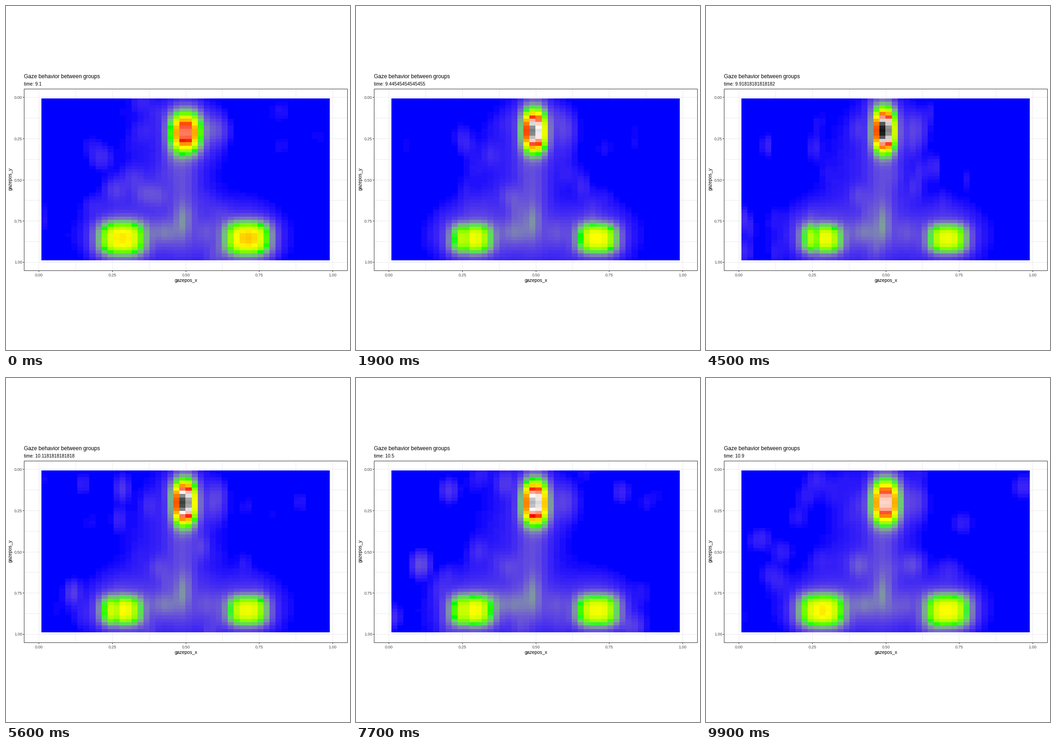
Animation of 748x748 px, one loop 10 s. Source, as a matplotlib script:

```python
import numpy as np
import matplotlib.pyplot as plt
from matplotlib.animation import FuncAnimation

SIZE, FRAMES, STEP = 748, 100, 11
X0, XS, Y0, YS = 71.45, 639.1, 197.45, 359.1  # data to pixels
GX, GY = np.meshgrid(np.arange(1, 49) / 49, np.arange(1, 49) / 49)

plt.rcParams["font.family"] = "Liberation Sans"


# colour scale, blended in Lab
M = np.array([[.4124564, .3575761, .1804375],
              [.2126729, .7151522, .0721750],
              [.0193339, .1191920, .9503041]])
WHITE = M.sum(axis=1)


def to_lab(rgb):
    rgb = np.asarray(rgb, float)
    lin = np.where(rgb > .04045, ((rgb + .055) / 1.055) ** 2.4, rgb / 12.92)
    t = lin @ M.T / WHITE
    x, y, z = np.where(t > .008856, np.cbrt(t), 7.787 * t + 16 / 116).T
    return np.stack([116 * y - 16, 500 * (x - y), 200 * (y - z)], axis=1)


def to_rgb(lab):
    l, a, b = lab.T
    y = (l + 16) / 116
    f = np.stack([y + a / 500, y, y - b / 200], axis=1)
    t = np.where(f > .206893, f ** 3, (f - 16 / 116) / 7.787)
    lin = np.clip((t * WHITE) @ np.linalg.inv(M).T, 0, 1)
    return np.where(lin > .0031308, 1.055 * lin ** (1 / 2.4) - .055, 12.92 * lin)


STOPS = to_lab([(0, 0, 1), (0, 1, 0), (1, 1, 0), (1, 0, 0), (1, 1, 1), (0, 0, 0)])
ramp = np.linspace(0, 1, 1001)
LUT = to_rgb(np.stack([np.interp(ramp, np.linspace(0, 1, 6), c) for c in STOPS.T], axis=1))


# gaze density
def blob(x, y, a, wx, wy, p=2):
    return a * np.exp(-np.abs((GX - x) / wx) ** p - np.abs((GY - y) / wy) ** p)


HANDS = .283, .711

BASE = (blob(.48, .84, .024, .26, .16)       # band between the hands
        + blob(.45, .5, .012, .15, .42)      # haze
        + blob(.49, .55, .028, .045, .3)     # trunk
        + blob(.49, .75, .055, .022, .1)
        + blob(.43, .82, .05, .045, .065)
        + blob(.57, .82, .02, .03, .07)
        + blob(.41, .6, .022, .03, .065)
        + blob(.5, .21, .02, .075, .2)       # halos
        + blob(.6, .2, .028, .035, .1)
        + sum(blob(x, .84, .03, .09, .16) for x in HANDS))


def sway(k, *values):
    """Value at step k, between four key poses."""
    return np.interp(k, (0, 19, 45, 99), values)


def focus(k):
    return sway(k, 0, .6, 1, .1)


def peaks(k):
    head = blob(sway(k, .5, .496, .496, .5), sway(k, .216, .207, .203, .203),
                sway(k, .65, .87, .97, .75), sway(k, .047, .036, .033, .041),
                sway(k, .112, .117, .122, .12), 2.5)
    size = sway(k, 1, .88, .85, .98)
    left = blob(HANDS[0], .858, sway(k, .38, .34, .34, .37), .074 * size, .096 * size, 3)
    right = blob(HANDS[1], .858, sway(k, .41, .36, .34, .36), .072 * size, .096 * size, 3)
    notch = 1 - .35 * focus(k) * np.exp(-((GX - .265) / .012) ** 2)
    return head + left * notch + right


def speckle(k):
    """Stray glances, narrower while the gaze is focused."""
    rng = np.random.default_rng(k + 3)
    wx = .036 - .016 * focus(k)
    return sum(blob(rng.normal(.42, .26), rng.random(), abs(rng.normal(0, .011)), wx, .066)
               for _ in range(42))


SPECKLE = [speckle(k) for k in range(0, FRAMES, STEP)]


def heat(k):
    i, part = divmod(k, STEP)
    j = min(i + 1, len(SPECKLE) - 1)
    stray = SPECKLE[i] + (SPECKLE[j] - SPECKLE[i]) * part / STEP
    v = np.clip(BASE + peaks(k) + stray - .003, 0, 1)
    return LUT[np.round(v * 1000).astype(int)]


# plot
fig = plt.figure(figsize=(SIZE / 100, SIZE / 100), dpi=100, facecolor="white")
ax = fig.add_axes([0, 0, 1, 1])
ax.axis("off")


def mid(v):
    return np.floor(v) + .5


def line(x1, y1, x2, y2, color, z):
    ax.plot([x1, x2], [y1, y2], color=color, lw=.72, zorder=z, solid_capstyle="butt")


def text(x, y, s, px, color="black", va="baseline", **kw):
    return ax.text(x, y, s, fontsize=px * .72, color=color, va=va, **kw)


LEFT, RIGHT, TOP, BOTTOM = 39.5, 742.5, 179.5, 574.5
LIGHT, DARK, GREY = "#ebebeb", "#333333", "#4d4d4d"

for i in range(9):
    t = i / 8
    x, y = mid(X0 + t * XS), mid(Y0 + t * YS)
    line(x, TOP, x, BOTTOM, LIGHT, 1)
    line(LEFT, y, RIGHT, y, LIGHT, 1)
    if i % 2 == 0:
        line(x, BOTTOM, x, BOTTOM + 3.5, DARK, 3)
        line(LEFT - 3.5, y, LEFT, y, DARK, 3)
        text(x, 588, f"{t:.2f}", 9, GREY, ha="center")
        text(35.5, y + 4, f"{t:.2f}", 9, GREY, ha="right")

ax.add_patch(plt.Rectangle((LEFT, TOP), RIGHT - LEFT, BOTTOM - TOP,
                           fill=False, ec=DARK, lw=.72, zorder=3))
text(39, 157, "Gaze behavior between groups", 11.9)
text(391, 600, "gazepos_x", 10.3, ha="center")
text(15, 376.5, "gazepos_y", 10.3, va="center", ha="right", rotation=90)
label = text(39, 173, "", 10.05)

image = ax.imshow(heat(0), extent=(77, 704, 553, 201), interpolation="nearest",
                  aspect="auto", zorder=2)
ax.set_xlim(0, SIZE)
ax.set_ylim(SIZE, 0)


def update(k):
    image.set_data(heat(k))
    label.set_text(f"time: {9.1 + k * 1.8 / 99:.15g}")
    return image, label


anim = FuncAnimation(fig, update, frames=FRAMES, interval=100, repeat=True, repeat_delay=0)
plt.show()
```
